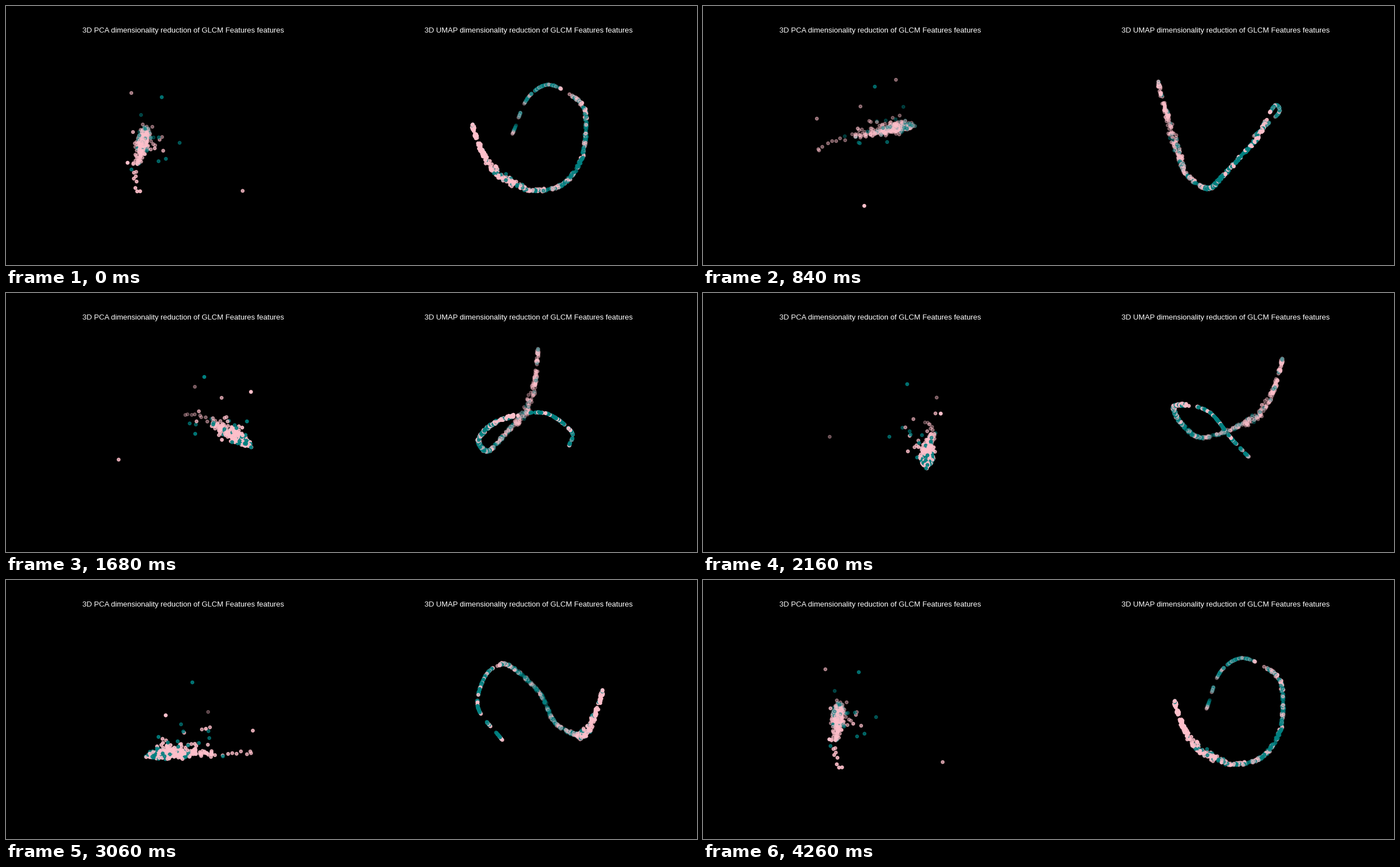
A matplotlib script for the animation above (4.32 s loop, 1222 by 458 pixels).

```python
import numpy as np
import matplotlib.pyplot as plt
from matplotlib.animation import FuncAnimation
from mpl_toolkits.mplot3d import Axes3D  # noqa: F401

W, H, DPI = 1222, 458, 80
FRAMES, STEP = 72, 5            # five degrees of azimuth per frame
SIDE, TOP = 352.66, 55          # square axes, in pixels
HALF_XY, HALF_Z = 113.47, 85.1  # limits that make one data unit one pixel
PINK, TEAL = "pink", "teal"

rng = np.random.default_rng(7)

# Lone points that mark the extent of the first cloud
LONE_PINK = [(70, 99, -74), (-61, -98, 50), (92, -99, -3), (10, -93, 10)]
LONE_TEAL = [(0, -42, 74), (-70, -82, 0)]

# Key points of the curve that the second cloud follows
KEYS = np.array([
    (98, -98, 74), (88, -81, 11), (81, -50, -38), (79, 1, -66),
    (58, 55, -68), (43, 86, -29), (10, 95, 13), (-21, 92, 43),
    (-44, 67, 57), (-74, 32, 60), (-98, -4, 24), (-62, -35, -36),
])
GAPS = [(0.045, 0.065), (0.705, 0.735), (0.905, 0.93), (0.95, 0.972)]


def paint(teal_share):
    """Colour each point teal with its own probability, else pink."""
    return list(np.where(rng.random(len(teal_share)) < teal_share, TEAL, PINK))


def bump(f, mid, width):
    return np.exp(-((f - mid) / width) ** 2)


def streak(n, lift):
    """Dense streak that widens from its tip and scatters upwards."""
    s = np.minimum(rng.gamma(4, 12.5, n), 120)
    side = rng.normal(0, 1, n) * np.minimum(1 + 0.1 * s, 5)
    up = rng.exponential(1, n) * np.minimum(1 + 0.1 * s, lift)
    return np.column_stack([s - 97, side - 73 - 0.1 * s, up - 41 - 0.06 * s])


def pca_cloud():
    core, loose = streak(430, 4), streak(50, 11)
    q = np.linspace(0, 1, 11)
    tail = np.column_stack([20 + 79 * q, 10 * q - 92, -46 - 11 * q])
    tail += rng.normal(0, 3, tail.shape)
    halo = rng.normal((-16, -60, -26), (26, 18, 11), (20, 3))
    colors = paint(0.12 + 0.38 * (core[:, 0] < -62))
    colors += paint(np.full(len(loose), 0.5))
    colors += paint(0.1 * np.ones(len(tail))) + paint(0.4 * np.ones(len(halo)))
    colors += [PINK] * len(LONE_PINK) + [TEAL] * len(LONE_TEAL)
    return np.vstack([core, loose, tail, halo, LONE_PINK, LONE_TEAL]), colors


def along(f):
    """Points at fractions f of a smooth cubic path through the keys."""
    steps = np.linalg.norm(np.diff(KEYS, axis=0), axis=1)
    knots = np.append(0, np.cumsum(steps)) / steps.sum()
    slope = np.gradient(KEYS, knots, axis=0)
    i = np.clip(np.searchsorted(knots, f, "right") - 1, 0, len(steps) - 1)
    gap = (knots[i + 1] - knots[i])[:, None]
    t = (f - knots[i])[:, None] / gap
    a, b = KEYS[i], KEYS[i + 1]
    return (a + (b - a) * t * t * (3 - 2 * t)
            + gap * t * (1 - t) * (slope[i] * (1 - t) - slope[i + 1] * t))


def umap_cloud(n=760):
    f = rng.random(n)
    f = np.clip(f + 0.0025 * np.sin(80 * np.pi * f), 0, 1)  # bunch into clumps
    for lo, hi in GAPS:
        f = f[(f < lo) | (f > hi)]
    # hollow, swollen band on the lower bend and a thin thread at the far end
    radius = np.where(f > 0.72, 0.4, 2 + 4.5 * bump(f, 0.19, 0.08))
    spin = rng.normal(0, 1, (len(f), 3))
    spin /= np.linalg.norm(spin, axis=1)[:, None]
    pts = along(f) + spin * (radius * rng.uniform(0.6, 1.3, len(f)))[:, None]
    share = (0.08 + 0.65 * np.clip((f - 0.15) / 0.25, 0, 1)
             - 0.35 * bump(f, 0.66, 0.05) + 0.15 * np.sin(150 * f))
    return pts, paint(share)


def add_panel(fig, mid, title, cloud):
    rect = [(mid - SIDE / 2) / W, 1 - (TOP + SIDE) / H, SIDE / W, SIDE / H]
    ax = fig.add_axes(rect, projection="3d", facecolor="black")
    pts, colors = cloud
    ax.scatter(*pts.T, c=colors, s=22, linewidths=1.5)
    ax.set(xlim=(-HALF_XY, HALF_XY), ylim=(-HALF_XY, HALF_XY),
           zlim=(-HALF_Z, HALF_Z))
    ax.set_axis_off()
    fig.text(mid / W, 1 - 47.5 / H, title, color="white", ha="center",
             va="baseline", fontsize=11.9, family="Liberation Sans")
    return ax


fig = plt.figure(figsize=(W / DPI, H / DPI), dpi=DPI, facecolor="black")
TITLE = "3D {} dimensionality reduction of GLCM Features features"
panels = [
    add_panel(fig, 313.5, TITLE.format("PCA"), pca_cloud()),
    add_panel(fig, 924.5, TITLE.format("UMAP"), umap_cloud()),
]


def update(i):
    for ax in panels:
        ax.view_init(elev=30, azim=STEP * i)
    return panels


anim = FuncAnimation(fig, update, frames=FRAMES, interval=60,
                     init_func=lambda: update(0), repeat=True, repeat_delay=0)
plt.show()
```
